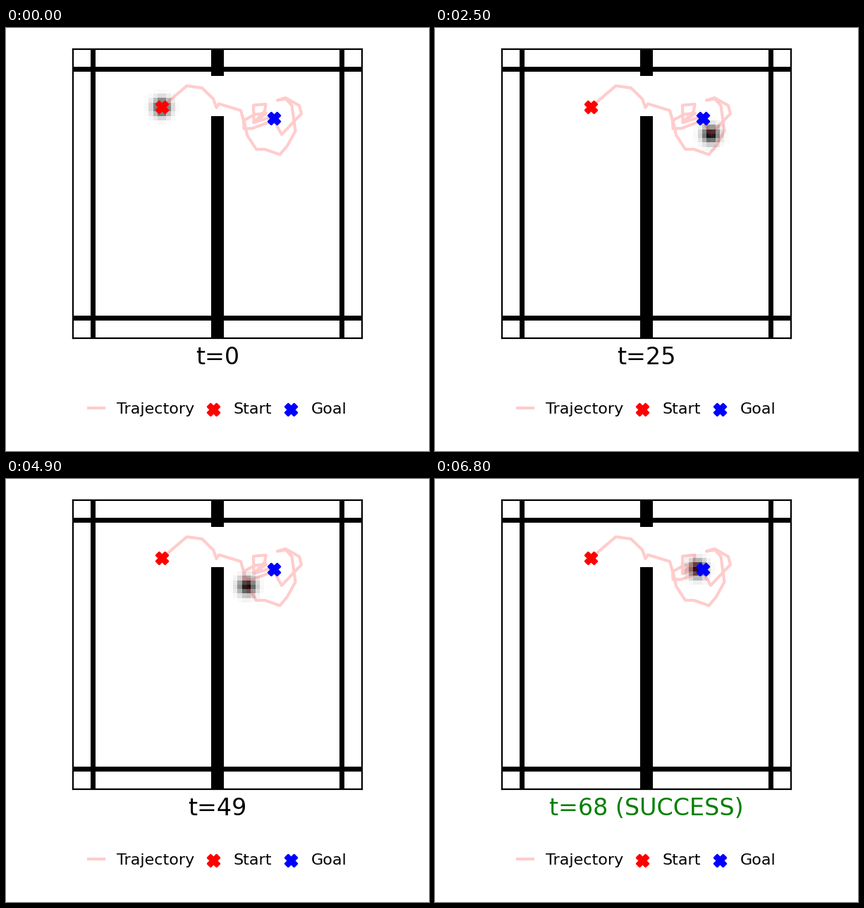
These frames come from a looping animation (600 by 600 pixels, 6.9 s). A matplotlib script:

```python
import numpy as np
import matplotlib.pyplot as plt
from matplotlib.animation import FuncAnimation
from matplotlib.lines import Line2D

SIZE, DPI = 600, 200
STEPS = 69
GRID = 65                      # cells per side
LEFT, TOP, SIDE = 95, 30, 410  # arena box in pixels
SIGMA = 1.3                    # dot radius in cells
PINK = dict(color="red", alpha=0.2, lw=1.5)
START, GOAL = (221, 112.3), (380.2, 128.2)

# Turning points of the walk: (step, x, y) in stage pixels
TURNS = [
    (0, *START), (4, 256.5, 82), (7, 278, 85), (9, 294, 100.5),
    (11, 298.5, 113), (12, 302, 107.5), (15, 333, 117),            # doorway
    (17, 337, 131), (18, 337.5, 142.5), (19, 349, 142.5),
    (22, 380, 131), (25, 391, 151), (29, 419, 121.5),              # past the goal
    (30, 416, 110), (32, 396.5, 99), (33, 385, 102.5), (34, 397, 100.5),
    (36, 405.5, 110), (39, 410.5, 146), (42, 399, 167),            # wide loop
    (44, 388.5, 179.5), (46, 367, 172), (47, 355, 172), (49, 342, 152),
    (51, 337.5, 131), (53, 353, 122.5), (55, 369, 121),            # homing in
    (57, 351.5, 134), (60, 351, 109.5), (62, 368.5, 108),
    (63, 367, 118), (66, 351.5, 134), (68, 372.5, 127.5),
]


def to_cells(points):
    return (np.asarray(points) - (LEFT, TOP)) * GRID / SIDE - 0.5


def walk():
    """Even steps along straight legs between the turning points."""
    when, x, y = np.transpose(TURNS)
    t = np.arange(STEPS)
    return to_cells(np.column_stack([np.interp(t, when, x),
                                     np.interp(t, when, y)]))


def make_walls():
    walls = np.zeros((GRID, GRID))
    walls[:, 31:34] = 1
    walls[6:15, 31:34] = 0
    walls[[4, 60], :] = 1
    walls[:, [4, 60]] = 1
    return walls


def render(x, y):
    rows, cols = np.mgrid[:GRID, :GRID]
    dot = np.exp(-((cols - x) ** 2 + (rows - y) ** 2) / (2 * SIGMA ** 2))
    return np.maximum(WALLS, np.where(dot < 0.01, 0, dot))


def full_axes(fig):
    ax = fig.add_axes([0, 0, 1, 1])
    ax.set(xlim=(0, SIZE), ylim=(SIZE, 0))
    ax.axis("off")
    return ax


def cross(ax, point, color):
    ax.scatter(*point, marker="X", color=color, zorder=3)


plt.rcParams["font.family"] = "DejaVu Sans"
WALLS = make_walls()
path = walk()

fig = plt.figure(figsize=(SIZE / DPI, SIZE / DPI), dpi=DPI, facecolor="white")
arena = fig.add_axes([LEFT / SIZE, 1 - (TOP + SIDE) / SIZE,
                      SIDE / SIZE, SIDE / SIZE])
image = arena.imshow(render(*path[0]), cmap="gray_r", vmin=0, vmax=1,
                     interpolation="nearest")
arena.plot(*path.T, **PINK)
cross(arena, to_cells(START), "red")
cross(arena, to_cells(GOAL), "blue")
arena.set(xticks=[], yticks=[], xlim=(-0.5, GRID - 0.5), ylim=(GRID - 0.5, -0.5))

stage = full_axes(fig)
label = stage.text(300, 477, "", fontsize=12, ha="center", va="baseline")

# Legend row
stage.add_line(Line2D([117, 139], [539, 539], **PINK))
cross(stage, (294.3, 541), "red")
cross(stage, (404.3, 541), "blue")
for x, name in ((157, "Trajectory"), (322.7, "Start"), (432.7, "Goal")):
    stage.text(x, 547, name, fontsize=8, va="baseline")


def update(t):
    done = t == STEPS - 1
    image.set_data(render(*path[t]))
    label.set_text(f"t={t}" + (" (SUCCESS)" if done else ""))
    label.set_color("green" if done else "black")
    return image, label


anim = FuncAnimation(fig, update, frames=STEPS, interval=100,
                     repeat=True, repeat_delay=0, blit=False)
plt.show()
```
